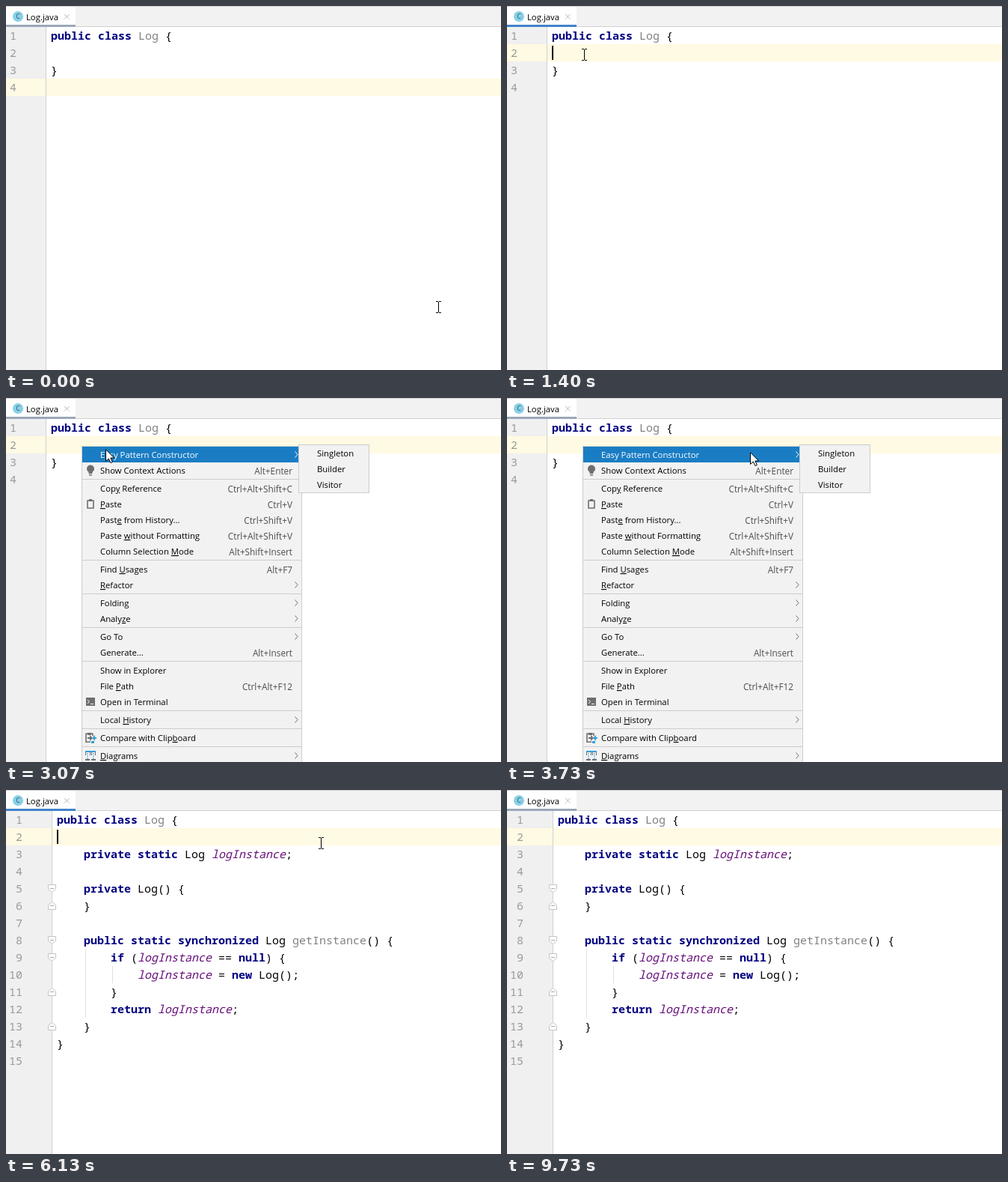
An HTML page for the animation above (9790 ms loop, 662 by 486 pixels).

```html
<!DOCTYPE html>
<html lang="en">
<head>
<meta charset="utf-8">
<title>Log.java</title>
<style>
html, body { margin: 0; width: 100%; height: 100%; overflow: hidden; background: #fff; }
svg { display: block; }
text { font: 11.3px "Open Sans", "Noto Sans", sans-serif; white-space: pre; }
.code { font: 15px "Noto Sans Mono", "DejaVu Sans Mono", monospace; }
.num { fill: #999; }
.kw { font-weight: bold; fill: #000080; }
.dim { fill: #808080; }
.field { font-style: italic; fill: #660e7a; }
.key { font-size: 11.8px; fill: #4d4d4d; text-anchor: end; }
.u { text-decoration: underline; }
.line { fill: none; stroke: #6e6e6e; }
</style>
</head>
<body>
<svg id="stage" width="662" height="486" viewBox="0 0 662 486"></svg>
<script>
const LOOP = 9790;
const rect = (x, y, w, h, fill, more = '') =>
  `<rect x="${x}" y="${y}" width="${w}" height="${h}" fill="${fill}" ${more}/>`;
const text = (x, y, s, more = '') => `<text x="${x}" y="${y}" ${more}>${s}</text>`;
const path = (d, more = 'class="line"') => `<path d="${d}" ${more}/>`;
const group = (id, body) => `<g id="${id}">${body}</g>`;
const span = (cls, s) => `<tspan class="${cls}">${s}</tspan>`;
const box = (x, y, w, h) =>
  rect(x + .5, y + .5, w - 1, h - 1, '#f2f2f2', 'stroke="#cdcdcd"');

// Editor text
const KEYWORDS = /\b(public|class|private|static|synchronized|if|null|new|return)\b/g;
const before = ['public class Log {', '', '}', ''];
const after = `public class Log {

    private static Log logInstance;

    private Log() {
    }

    public static synchronized Log getInstance() {
        if (logInstance == null) {
            logInstance = new Log();
        }
        return logInstance;
    }
}
`.split('\n');

function paint(line, analysed) {
  const header = line.startsWith('public class');
  let s = line.replace(KEYWORDS, '\u0001$1\u0002');
  if (header) s = s.replace('Log', span('dim', 'Log'));
  if (analysed) s = s.replace('logInstance', span('field', 'logInstance'))
    .replace('getInstance', span('dim', 'getInstance'));
  return s.replace(/\u0001(\w+)\u0002/g, span('kw', '$1'));
}
const code = (lines, x, analysed) => lines.map((line, i) =>
  text(x, 45 + 23 * i, paint(line, analysed), 'class="code"')).join('');
const gutter = (lines, edge) => rect(edge, 28, 1, 458, '#d0d0d0') + lines.map((_, i) =>
  text(edge - 40, 45 + 23 * i, i + 1, 'class="code num" text-anchor="end"')).join('');

// Folding marks: d is 1 for a block start, -1 for a block end
const fold = (row, d) => {
  const y = 16.5 + 23 * row;
  return path(`M56.5 ${y - 5 * d}h10v${6 * d}l-5 ${4 * d}-5 ${-4 * d}z`, 'fill="#fff" stroke="#c4c4c4"') +
    path(`M59 ${y}h5`, 'stroke="#a8a8a8"');
};
const folds = rect(106, 212, 1, 92, '#e0e0e0') + rect(142, 235, 1, 23, '#e0e0e0') +
  [5, 8, 9].map(r => fold(r, 1)).join('') + [6, 11, 13].map(r => fold(r, -1)).join('');

// Context menu: "_" marks the mnemonic, ">" a submenu
const MENU = [
  ['Easy Pattern Constructor|>', 'Show Context Actions|Alt+Enter'],
  ['Cop_y Reference|Ctrl+Alt+Shift+C', '_Paste|Ctrl+V', 'Past_e from History...|Ctrl+Shift+V',
    'Paste _without Formatting|Ctrl+Alt+Shift+V', 'Column Selection _Mode|Alt+Shift+Insert'],
  ['Find _Usages|Alt+F7', '_Refactor|>'],
  ['Folding|>', 'Analy_ze|>'],
  ['Go To|>', 'Generate...|Alt+Insert'],
  ['Show in Explorer|', 'File _Path|Ctrl+Alt+F12', 'Open in Terminal|'],
  ['Local _History|>'],
  ['Compare with Clip_board|'],
  ['_Diagrams|>']
];
const chevron = (y, color) =>
  path(`M386.5 ${y - 4.5}l3.5 4-3.5 4`, `fill="none" stroke="${color}"`);

function menu() {
  let y = 76, out = box(101, 64, 295, 440);
  for (const items of MENU) {
    for (const item of items) {
      const [label, key] = item.split('|');
      out += text(126, y + 4, label.replace(/_(.)/, span('u', '$1')));
      out += key === '>' ? chevron(y, '#6e6e6e') : text(383, y + 4.5, key, 'class="key"');
      y += 21;
    }
    out += rect(102, y - 10, 293, 1, '#cdcdcd');
    y += 3;
  }
  return out + icons();
}

function icons() {
  const grey = '#6e6e6e', blue = '#389fd6';
  const fill = c => `fill="${c}"`;
  return `<circle cx="113" cy="94.5" r="5" fill="${grey}"/>` +
    rect(110.5, 98, 5, 3, grey) + rect(111, 102, 4, 1.5, grey) +
    path('M109 137h8v10h-8z', `fill="none" stroke="${grey}" stroke-width="1.6"`) + rect(111, 135, 4, 3, grey) +
    rect(107, 400, 12, 11, grey) + path('M109 403l2.5 2.5-2.5 2.5M113 408.5h4', 'fill="none" stroke="#fff"') +
    path('M113 459.3h-6v-11h9v3', `fill="none" stroke="${grey}" stroke-width="1.6"`) + rect(109, 447, 5, 3, grey) +
    path('M109 453h3v-3l4 4-4 4v-3h-3z', fill(grey)) +
    path('M121 453h-2v-3l-4 4 4 4v-3h2z', fill(blue)) + path('M114 458h4v3h-4z', fill(blue)) +
    rect(106, 471, 14, 2, blue) + rect(106, 482, 6, 2, grey) + rect(114, 482, 6, 2, grey) +
    path('M109 474v8M117 474v8', `stroke="${blue}" stroke-dasharray="2 1"`) +
    path('M106.5 473v4M112.5 473v4M114.5 473v4M119.5 473v4', `stroke="${grey}"`);
}

const white = 'fill="#fff"', accent = '#1a7dc4';
stage.innerHTML =
  rect(0, 0, 662, 486, '#fff') +
  rect(0, 0, 662, 28, '#f2f2f2') + rect(0, 0, 662, 1, '#d1d1d1') + rect(0, 27, 662, 1, '#d1d1d1') +
  rect(0, 1, 93, 24, '#fff') + rect(0, 25, 93, 3, '#9ca7b8', 'id="tabline"') +
  '<circle cx="16" cy="14" r="7" fill="#87d0e7"/>' +
  text(16, 17.2, 'C', 'text-anchor="middle" style="font-size:9px" fill="#34505c"') +
  text(27, 18.5, 'Log.java') + path('M78 11l6.5 6.5M84.5 11l-6.5 6.5', 'stroke="#b8b8b8"') +
  rect(0, 28, 53, 458, '#f0f0f0', 'id="margin"') +
  rect(0, 97, 662, 23, '#fffae3', 'id="row"') +
  group('old', gutter(before, 53).replaceAll('text-anchor="end"', '').replaceAll('x="13"', 'x="5"') + code(before, 60)) +
  group('fresh', gutter(after, 61) + group('plain', code(after, 68)) +
    group('analysed', code(after, 68, true)) + group('folds', folds)) +
  rect(60, 53, 2, 19, '#000', 'id="caret"') +
  group('menu', menu()) +
  group('hover', rect(102, 65, 293, 21, accent) + text(126, 80, 'Easy Pattern Constructor', white) + chevron(76, '#fff')) +
  group('sub', box(391, 62, 95, 65) + ['Singleton', 'Builder', 'Visitor'].map((s, i) => text(416, 78 + 21 * i, s)).join('')) +
  group('pick', rect(392, 63, 93, 21, accent) + text(416, 78, 'Singleton', white)) +
  group('beam', rect(0, -7, 1, 14, '#000') + [-8, 7].map(y => rect(-3, y, 3, 1, '#000') + rect(1, y, 3, 1, '#000')).join('')) +
  group('arrow', path('M.5 .8V16.5L4.3 13 7 18.6 9.4 17.5 6.9 12H11.6Z', 'fill="#fff" stroke="#000"'));

// Right-aligned numbers for the wide gutter end at x = 22
const el = id => document.getElementById(id);
el('fresh').querySelectorAll('.num').forEach(n => n.setAttribute('x', 22));

// Pointer path: time, x, y
const PATH = [
  [0, 578, 402], [70, 535, 372], [130, 420, 290], [200, 260, 185], [270, 145, 115], [330, 110, 101], [400, 115, 126],
  [670, 115, 126], [1130, 103, 65], [2130, 103, 65], [2200, 101, 64], [2400, 101, 64], [2600, 116, 66],
  [3000, 116, 66], [3400, 212, 75], [3730, 325, 72], [4000, 408, 70], [4130, 421, 70], [4470, 421, 70],
  [4530, 421, 71], [6930, 421, 71], [7000, 414, 100], [7070, 385, 220], [7130, 345, 361], [LOOP, 345, 361]
];
function pointer(t) {
  const i = PATH.findIndex(p => p[0] > t), [t0, x0, y0] = PATH[i - 1], [t1, x1, y1] = PATH[i];
  const p = (t - t0) / (t1 - t0);
  return `translate(${Math.round(x0 + (x1 - x0) * p)} ${Math.round(y0 + (y1 - y0) * p)})`;
}

const show = (id, on) => el(id).style.display = on ? '' : 'none';
const set = (id, name, value) => el(id).setAttribute(name, value);

function draw(now) {
  const step = Math.floor((now % LOOP) * .015 + .06);
  const t = Math.min(Math.round(step * 20 / 3) * 10, LOOP - 10);
  const within = (a, b) => t >= a && t < b;
  const done = t >= 4600;

  set('tabline', 'fill', within(1400, 2070) || within(4530, 9730) ? '#4083c9' : '#9ca7b8');
  set('row', 'y', t < 1400 ? 97 : 51);
  set('margin', 'width', done ? 61 : 53);
  show('old', !done);
  show('fresh', done);
  show('plain', t < 4870);
  show('analysed', t >= 4870);
  show('folds', t >= 4930);

  set('caret', 'x', done ? 68 : 60);
  show('caret', within(1400, 1870) || within(4600, 5600) || t >= 5600 && (t + 400) % 1000 >= 530);

  show('menu', within(2070, 4530));
  show('hover', within(2470, 4530));
  show('sub', within(2730, 4530));
  show('pick', within(4070, 4530));

  const arrow = within(2200, 4530);
  show('arrow', arrow);
  show('beam', !arrow && t < 7200);
  set(arrow ? 'arrow' : 'beam', 'transform', pointer(t));
}

const start = performance.now();
function tick() {
  draw(performance.now() - start);
  requestAnimationFrame(tick);
}
tick();
</script>
</body>
</html>
```
